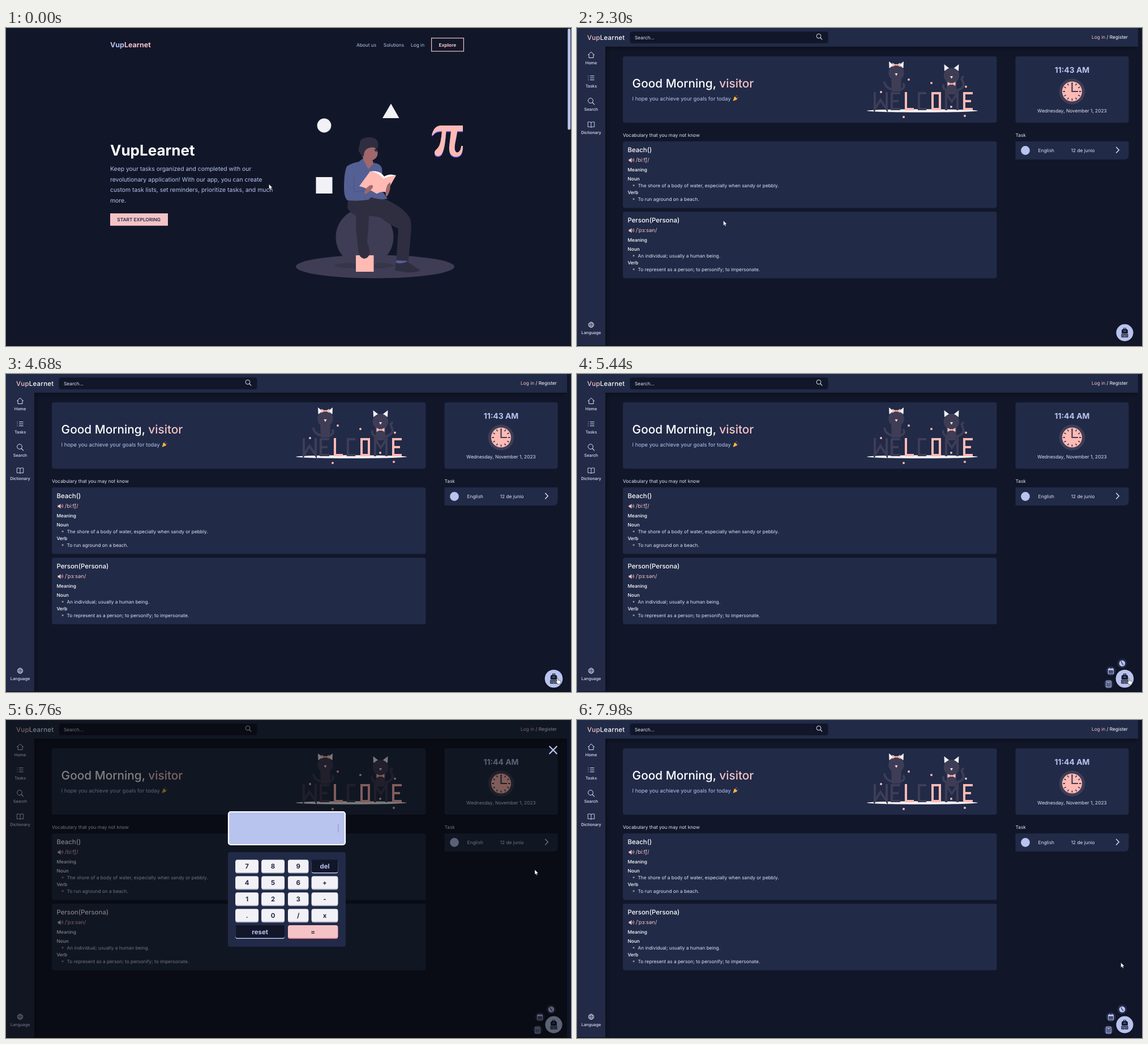
Write an HTML page that moves like this. It is 998 by 561 pixels and loops after 8 s.

```html
<!DOCTYPE html>
<html lang="en">
<head>
<meta charset="utf-8">
<title>Study app tour</title>
<style>
html,body{margin:0;width:100%;height:100%;overflow:hidden;background:#111729}
svg{display:block;width:998px;height:561px}
text{font-family:Inter,"Noto Sans",sans-serif;font-optical-sizing:none;text-rendering:geometricPrecision;white-space:pre}
</style>
</head>
<body>
<svg id="stage" viewBox="0 0 998 561" xmlns="http://www.w3.org/2000/svg"></svg>
<script>
const BG = '#111729', PANEL = '#212a47', LAV = '#b8c3ee', PINK = '#f4c3c6', WHITE = '#fffffe',
  SOFT = '#dfe3f5', DARK = '#2f2e41', PLUM = '#3f3d56', ROSE = '#ffbab4', SKIN = '#a0686a', LOOP = 8000;

const text = (x, y, size, str, fill = WHITE, weight = 400, extra = '') =>
  `<text x="${x}" y="${y}" font-size="${size}" fill="${fill}" font-weight="${weight}" ${extra}>${str}</text>`;
const mid = (x, y, size, str, fill, weight, extra = '') =>
  text(x, y, size, str, fill, weight, 'text-anchor="middle" ' + extra);
const rect = (x, y, w, h, fill, r = 0, extra = '') =>
  `<rect x="${x}" y="${y}" width="${w}" height="${h}" rx="${r}" fill="${fill}" ${extra}/>`;
const circle = (x, y, r, fill, extra = '') => `<circle cx="${x}" cy="${y}" r="${r}" fill="${fill}" ${extra}/>`;
const oval = (x, y, rx, ry, fill, extra = '') =>
  `<ellipse cx="${x}" cy="${y}" rx="${rx}" ry="${ry}" fill="${fill}" ${extra}/>`;
const path = (d, fill, extra = '') => `<path d="${d}" fill="${fill}" ${extra}/>`;
const line = (d, stroke, w = 1, extra = '') =>
  `<path d="${d}" fill="none" stroke="${stroke}" stroke-width="${w}" ${extra}/>`;
const group = (id, body, extra = '') => `<g id="${id}" ${extra}>${body}</g>`;
const span = (str, fill) => `<tspan fill="${fill}">${str}</tspan>`;
const round = 'stroke-linecap="round" stroke-linejoin="round"';

function reader() {
  const pi = 'M752 189C755 177 760 172 770 172H807V182H797C796 194 791 207 793 215C795 223 803 220 804 208H807C807 221 803 227 795 227C785 227 782 219 783 208L786 182H777.500C776 198 775 213 770 222C766 228 757 227 757 220C757 215 762 214 765 208C768 202 769 192 770 182H768C760 182 757 185 754 189Z';
  return oval(652, 421, 140, 20.5, PLUM) +
    oval(633, 419, 53, 5.5, '#373549') + circle(633.5, 369, 51, PLUM) +
    rect(618, 401, 31.5, 29, ROSE) +
    rect(547.5, 263, 29, 29, '#f2f1f5') + circle(562, 172, 12.4, '#f2f1f5') + path('M680 133.5L694.5 159H665Z', '#f2f1f5') +
    path(pi, '#6c63ff', 'transform="translate(0 1.5)"') + path(pi, ROSE) +
    // legs and shoes
    path('M690 409H710L705 415H689Z', '#56619a') +
    path('M688 414Q698 417 709 412Q721 421 732 427Q729 431 711 431.500L687 428Z', DARK) +
    path('M604 303L662 299Q699 313 712 333Q717 341 715.500 357L711 411L689.500 410L693 354Q674 345 661 334L641 331L640 354L638 378Q643 390 642 399Q640 406 632 407Q624 405 622 393L620.500 376L618 354V331Q606 325 603 317Z', DARK) +
    // head, neck and shirt
    path('M630 224L647 232L650 241L640 250L631 234Z', SKIN) + oval(644, 221, 12.5, 12.5, SKIN) +
    path('M623 213L626 198Q634 191.500 646 193Q656 195 657.500 204L657 213Q646 208 638 213Q632 217 632 225L629 228Q626 220 623 218Z', DARK) +
    path('M650 215Q653 212 656 215L654 219Z', DARK) +
    path('M623 236L630 230.500L640 249L650 238Q661 239 664 247L666 290L674 301Q664 304 645 299L640 303Q620 306 603 304Q597 299 597 282Q597 255 602 244Q611 238 623 236Z', '#545f93') +
    line('M616 262Q613 274 615 289L633 287', '#46507f', .8) +
    // book and hands
    path('M643 253Q660 250 668 262Q677 256 689 260L680 272L655 284L640 263Z', '#fff') +
    path('M643 253Q655 253 667 265.500Q677 261 689 260L672 290Q663 287 655 292.500Q640 283 624 279Z', ROSE) +
    path('M633 292Q634 283 642 278Q649 275 648 281Q643 289 635 293Z', SKIN) +
    path('M671 297Q669 287 674 276L679 272Q680 285 674 296Z', SKIN);
}

function landing() {
  const lines = ['Keep your tasks organized and completed with our', 'revolutionary application! With our app, you can create',
    'custom task lists, set reminders, prioritize tasks, and much', 'more.'];
  return rect(0, 0, 998, 561, BG) +
    text(184, 34, 12.48, span('Vup', LAV) + span('Learnet', PINK), LAV, 700) +
    text(619, 33, 8.32, 'About us', LAV) + text(666.8, 33, 8.32, 'Solutions', LAV) + text(715, 33, 8.32, 'Log in', LAV) +
    rect(751.6, 17.8, 56.8, 23.2, 'none', 0, `stroke="${PINK}" stroke-width="1.2"`) +
    mid(779.8, 33, 8.32, 'Explore', PINK, 700) +
    text(184, 225, 26, 'VupLearnet', WHITE, 700) +
    lines.map((s, i) => text(184, 251.8 + i * 18.72, 10.4, s, LAV)).join('') +
    rect(184, 327, 102, 21.8, PINK) + mid(234.7, 341, 8.32, 'START EXPLORING', '#232946', 600) +
    reader() + rect(992.2, 1, 5, 178.500, LAV, 2.5);
}

function cat(x, y, bowY) {
  const ear = s => path(`M${x + 13 * s} ${y - 20}L${x + 12.500 * s} ${y - 8}L${x + 4 * s} ${y - 13}Z`, '#f2f1f5');
  const bow = path(`M${x} ${bowY}l-7 -3.500v7zl7 -3.500v7z`, ROSE) + circle(x, bowY, 1.600, ROSE);
  return ear(-1) + ear(1) + circle(x, y, 13.8, PLUM) +
    path(`M${x - 9} ${y + 9}H${x + 9}L${x + 8} ${y + 33}H${x - 8}Z`, PLUM) +
    path(`M${x - 2.500} ${y + 1}h5l-2.500 4z`, '#f2f1f5') + circle(x, y + 4, 1.100, ROSE) +
    circle(x - 5, y - 2, .8, DARK) + circle(x + 5, y - 2, .8, DARK) + bow;
}

function welcome() {
  const dots = [[586, 91], [537, 113], [626, 97], [687, 103.5], [577, 157], [685, 155], [661, 139]];
  const e = x => `M${x + 15} 115H${x}V143H${x + 15}M${x} 129H${x + 12}`;
  return cat(564, 79, 65) + cat(661.5, 84, 98.5) +
    line('M555 108Q545 105 543 96M573 108Q580 105 577 99M654 110Q646 108 647 101M671 110Q687 106 681 93Q678 88 682 86', PLUM, 4, round) +
    oval(610, 146, 98, 2.7, '#f2f1f5') +
    line('M526 113V143L536 127L547 143V113' + e(556) + 'M617 115H604V143H617M652 145V115L662 130L672 115V145', PLUM, 4) +
    line('M581 113V143H595M628 115H641V143H628Z' + e(684), ROSE, 4) +
    dots.map(([x, y]) => circle(x, y, 2, ROSE)).join('');
}

function wallClock() {
  let ticks = '';
  for (let i = 0; i < 12; i++) {
    const a = i * Math.PI / 6, c = Math.cos(a), s = Math.sin(a);
    ticks += `M${874.5 + 12.500 * c} ${112 + 12.500 * s}L${874.5 + 16 * c} ${112 + 16 * s}`;
  }
  return circle(874.5, 112, 22.8, PLUM) + circle(874.5, 112, 17.6, ROSE) +
    line(ticks, PLUM, 1.8) + line('M874.500 97V112H885', PLUM, 2.2);
}

const popper = y => path(`M275.500 ${y + 3}L278 ${y - 5}Q282 ${y - 4} 283 ${y}Z`, '#f2b63c') +
  line(`M280 ${y - 5}q1 -2 3 -2M283 ${y - 2}q1 -2 2.500 -1`, '#c9655a', .8);

// Greeting, clock and task panels; the tall form has the pictures.
function panels(tall) {
  const h = tall ? 117 : 63, d = tall ? 54 : 0, g = tall ? 27 : 0;
  const font = tall ? '' : 'style="font-family:\'Liberation Sans\',sans-serif"';
  return rect(81, 50, 660.500, h, PANEL, 4) + rect(774.500, 50, 200, h, PANEL, 4) +
    text(97.6, 77.6 + g, 20.8, 'Good Morning, ' + span('visitor', PINK), WHITE, tall ? 500 : 400, font) +
    text(97.6, 101 + g, 9.36, 'I hope you achieve your goals for today', LAV) + popper(99 + g) +
    mid(874.500, tall ? 78.6 : 73, 13.9, '11:43 AM', LAV, 700, 'class="time"') +
    mid(874.500, tall ? 149 : 101.2, 8.32, 'Wednesday, November 1, 2023', SOFT) +
    text(81, 137.500 + d, 8.32, 'Vocabulary that you may not know', SOFT) +
    text(774.500, 137.500 + d, 8.32, 'Task', SOFT) +
    path(`M774.500 ${146 + d}h200v24q0 8 -8 8h-192z`, PANEL) + circle(792, 162 + d, 7.9, LAV) +
    text(814.6, 165 + d, 8.32, 'English', SOFT) + text(872.7, 165 + d, 8.32, '12 de junio', SOFT) +
    line(`M952.300 ${156 + d}l5 5.300l-5 5.300`, SOFT, 1.4) + (tall ? welcome() + wallClock() : '');
}

function word(y, title, sound, noun, verb) {
  const item = (dy, s) => text(98, y + dy + 1, 8.32, '*', PINK) + text(107.500, y + dy, 8.32, s, SOFT);
  const head = (dy, s) => text(89.4, y + dy, 8.32, s, WHITE, 500);
  return rect(81, y, 660.500, 117.5, PANEL, 4) + text(89.4, y + 19.4, 11.44, title, WHITE, 500) +
    path(`M91.500 ${y + 31.500}h2l3 -2.500v8.500l-3 -2.500h-2z`, PINK) +
    line(`M98 ${y + 31}q1.500 2 0 4M99.500 ${y + 29.500}q2.600 3.500 0 7`, PINK, .8) +
    text(103.8, y + 36.400, 9.36, sound, PINK) + head(52.500, 'Meaning') + head(68.700, 'Noun') +
    item(81, noun) + head(93, 'Verb') + item(105, verb);
}

function bars() {
  const label = (y, s) => mid(25, y, 7.28, s, SOFT, 500);
  const lens = (x, y, r) => line(`M${x + r * .7} ${y + r * .7}l${r * .8} ${r * .8}`, SOFT, 1.100, round) +
    circle(x, y, r, 'none', `stroke="${SOFT}" stroke-width="1"`);
  return rect(0, 0, 991, 33, PANEL, 0, 'filter="url(#shade)"') + rect(0, 33, 50, 528, PANEL, 0, 'filter="url(#shade)"') +
    rect(0, 0, 991, 33, PANEL) +
    text(18, 20.5, 11.44, span('Vup', PINK) + 'Learnet', WHITE, 500, 'letter-spacing=".25"') +
    rect(93.500, 6.300, 350, 20.700, BG, 4) + text(102, 20, 8.32, 'Search...', SOFT) + lens(427, 14.300, 3.9) +
    text(973, 19.4, 8.32, span('Log in', PINK) + ' / Register', WHITE, 400, 'text-anchor="end"') +
    line('M19.500 47.500L25 42.300L30.500 47.500M21 46.500V52.500H29V46.500', SOFT, 1, round) + label(63.700, 'Home') +
    line('M23 84.500H30.500M23 88H30.500M23 91.500H30.500M19.500 84.500h1M19.500 88h1M19.500 91.500h1', SOFT, 1) + label(104.700, 'Tasks') +
    lens(24, 128.200, 4.400) + label(145.700, 'Search') +
    line('M25 166.500Q22 165 19.300 166V174.500Q22 173.500 25 175Q28 173.500 30.700 174.500V166Q28 165 25 166.500V175', SOFT, .9, round) + label(186.700, 'Dictionary') +
    circle(25, 523.600, 4.600, 'none', `stroke="${SOFT}"`) + oval(25, 523.600, 2, 4.600, 'none', `stroke="${SOFT}" stroke-width=".8"`) +
    line('M20.500 522H29.500M20.500 525.300H29.500', SOFT, .8) + label(540.200, 'Language');
}

const disc = (id, x, y, icon) =>
  group(id, circle(0, 0, 8.7, PANEL, 'filter="url(#soft)"') + icon, `data-x="${x}" data-y="${y}"`);

function tools() {
  const ink = '#171d33';
  const clock = circle(0, 0, 5.300, LAV) + line('M0 .5L-2 -3.500M0 .5L2 2.500', PANEL, 1.100);
  const calendar = rect(-4.500, -3.800, 9, 8.800, 'none', 1, `stroke="${LAV}" stroke-width="1.200"`) + rect(-4.500, -3.800, 9, 2.600, LAV) +
    line('M-2.500 -5.500v3M2.500 -5.500v3', LAV, 1.200) + line('M-2.700 1H3M-2.700 3H3', LAV, 1, 'stroke-dasharray="1.200 1"');
  const calc = rect(-4.300, -5.300, 8.600, 10.600, 'none', 1, `stroke="${LAV}" stroke-width="1.200"`) + rect(-2.600, -3.500, 5.200, 2, LAV) +
    line('M-2.600 .5H3M-2.600 3H3', LAV, 1.300, 'stroke-dasharray="1.300 .7"');
  const bag = path('M-5.500 1V-3Q-5.500 -6.500 -2 -6.500H2Q5.500 -6.500 5.500 -3V1L3 2H-3Z', ink) +
    line('M-2 -6.500V-8H2V-6.500', ink, 1) + rect(-6, 2, 12, 6.300, ink, 1) +
    rect(-2, -3, 4, .8, LAV) + line('M-5 2.200H5M0 4V8', LAV, .7) +
    rect(-4.500, 4.200, 3.200, 2.400, 'none', .4, `stroke="${LAV}" stroke-width=".7"`) +
    rect(1.300, 4.200, 3.200, 2.400, 'none', .4, `stroke="${LAV}" stroke-width=".7"`);
  return disc('clock', 963, 510.500, clock) + disc('calendar', 943, 524, calendar) + disc('calc', 939, 547, calc) +
    group('tip', rect(-15, -4.700, 30, 9.400, LAV, 2) + mid(0, 1.900, 5.2, 'Calculator', '#232946', 600)) +
    group('fab', circle(0, 0, 15, LAV, 'filter="url(#soft)"') + bag);
}

function calculator() {
  const cols = [[405.200, 40.800], [451.200, 40.800], [498, 36.300], [539.700, 46.600]];
  const key = (x, y, w, s, fill, edge, ink) =>
    rect(x, y + 1.600, w, 22.400, edge, 3.500) + rect(x, y, w, 22.400, fill, 3.500) + mid(x + w / 2, y + 15.600, 11.44, s, ink, 700);
  const rows = ['7 8 9 del', '4 5 6 +', '1 2 3 -', '. 0 / x'];
  const keys = rows.map((r, i) => r.split(' ').map((s, j) => {
    const args = s === 'del' ? ['#121629', LAV, LAV] : ['#f2f1f6', '#aeb2c6', '#232946'];
    return key(cols[j][0], 246.500 + i * 28.900, cols[j][1], s, ...args);
  }).join('')).join('');
  return rect(393, 162, 206, 58, LAV, 4, 'stroke="#fff" stroke-width="2.200"') + rect(586.500, 184, .8, 14.500, '#7f86a8') +
    rect(392, 233, 208, 167, PANEL, 4) + keys +
    key(405.200, 362, 86.800, 'reset', '#121629', LAV, LAV) + key(498, 362, 88.300, '=', PINK, '#e8788c', '#232946') +
    line('M960.300 46.800L972.700 59.200M972.700 46.800L960.300 59.200', LAV, 2.300, round);
}

document.getElementById('stage').innerHTML =
  `<defs><filter id="shade" x="-10%" y="-100%" width="130%" height="300%"><feDropShadow dx="0" dy="0" stdDeviation="6" flood-color="#000" flood-opacity=".55"/></filter>
  <filter id="soft" x="-50%" y="-50%" width="200%" height="200%"><feDropShadow dx="0" dy="1" stdDeviation="1.800" flood-color="#000" flood-opacity=".5"/></filter></defs>` +
  group('landing', landing()) +
  group('app', rect(0, 0, 998, 561, BG) + group('small', panels(false)) + group('tall', panels(true)) +
    group('words',
      word(200, 'Beach()', '/biːt͡ʃ/', 'The shore of a body of water, especially when sandy or pebbly.', 'To run aground on a beach.') +
      word(324, 'Person(Persona)', '/ˈpɜːsən/', 'An individual; usually a human being.', 'To represent as a person; to personify; to impersonate.')) +
    bars() + rect(991, 0, 7, 561, BG) + tools()) +
  rect(0, 560, 998, 1, '#090c15') +
  group('status', rect(0, 550.500, 102, 10, '#2d2c2c', 1) +
    text(2.500, 558, 6.24, 'https://vup-learnet.vorlu.test/app', '#fff', 400, 'style="font-family:\'Open Sans\',sans-serif"')) +
  group('modal', rect(0, 0, 991, 561, '#030200', 0, 'opacity=".5"') + calculator()) +
  group('cursor',
    group('arrow', path('M0 0V8.800L2 7L3.400 10L4.800 9.400L3.500 6.500L6.200 6.300Z', '#fff', 'stroke="#000" stroke-width=".4"')) +
    group('hand', path('M-1 .9Q0 -.4 1 .9V4L5 5Q6.200 5.400 6 6.800L5.200 9.500V11H-.2V9.600L-3 6.600Q-2.600 5.200 -1 6.400Z', '#fff', 'stroke="#111" stroke-width=".5"')));

const $ = id => document.getElementById(id);
const times = document.querySelectorAll('.time');
const items = ['clock', 'calendar', 'calc'].map($);

// Cursor stops: time, x, y.
const stops = [[0, 464.5, 275.5], [340, 206, 346], [600, 258, 340], [2280, 258, 340], [2360, 261, 338], [2640, 261, 338],
  [3000, 450, 105], [3200, 610, 63], [3460, 765, 192], [3820, 858, 400], [4240, 976, 541], [4680, 974, 536], [5100, 975, 537],
  [5420, 975, 537], [5780, 956, 541], [6140, 948, 545], [6320, 948, 545], [6760, 934, 264.500], [7140, 965, 57],
  [7240, 966, 53], [7440, 966, 53], [7740, 969, 150], [7960, 965, 398], [8000, 955, 458]];

function slope(i, k) {
  const a = stops[i - 1], p = stops[i], b = stops[i + 1];
  if (!a || !b) return 0;
  if ((a[1] === p[1] && a[2] === p[2]) || (b[1] === p[1] && b[2] === p[2])) return 0;
  return (b[k] - a[k]) / (b[0] - a[0]);
}

function cursorAt(t) {
  let i = 0;
  while (i < stops.length - 2 && t >= stops[i + 1][0]) i++;
  const a = stops[i], b = stops[i + 1], d = b[0] - a[0], u = (t - a[0]) / d, u2 = u * u, u3 = u2 * u;
  return [1, 2].map(k => {
    const end = i === stops.length - 2 ? (b[k] - a[k]) / d : slope(i + 1, k);
    return a[k] * (2 * u3 - 3 * u2 + 1) + b[k] * (3 * u2 - 2 * u3) + d * ((u3 - 2 * u2 + u) * slope(i, k) + (u3 - u2) * end);
  });
}

const ramp = (t, a, b) => Math.min(1, Math.max(0, (t - a) / (b - a)));
const ease = u => 1 - (1 - u) ** 3;
const show = (id, on) => $(id).style.display = on ? '' : 'none';
const fade = (id, o) => { $(id).style.opacity = o; show(id, o > 0); };
const place = (el, x, y, more = '') => el.setAttribute('transform', `translate(${x} ${y}) ${more}`);

function draw(t) {
  show('landing', t < 1360);
  show('app', t >= 1360);
  show('small', t < 1460);
  show('tall', t >= 1460);
  show('words', t >= 1740);
  fade('status', ramp(t, 760, 940) * (1 - ramp(t, 1800, 1920)));
  const now = t < 4900 ? '11:43 AM' : '11:44 AM';
  times.forEach(e => { if (e.textContent !== now) e.textContent = now; });

  const hover = ramp(t, 4220, 4340) * (1 - ramp(t, 5600, 5720));
  place($('fab'), 967.5, 537.5, `scale(${1 + .05 * hover})`);

  const open = ease(ramp(t, 5100, 5280)), over = ramp(t, 5860, 5960) * (1 - ramp(t, 6340, 6440));
  items.forEach(el => {
    const s = open * (el.id === 'calc' ? 1 + .1 * over : 1);
    place(el, 967.5 + (el.dataset.x - 967.5) * open, 537.5 + (el.dataset.y - 537.5) * open, `scale(${s})`);
    el.style.display = open > 0 ? '' : 'none';
  });
  fade('tip', over);
  place($('tip'), 913.5 - 14 * (1 - ease(over)), 542.5, 'rotate(9)');
  fade('modal', ease(ramp(t, 6330, 6560)) * (1 - ramp(t, 7420, 7600)));

  const [x, y] = cursorAt(t);
  const hand = (t > 270 && t < 1360) || (t > 4210 && t < 6350) || (t > 7120 && t < 7520);
  show('hand', hand);
  show('arrow', !hand);
  place($('cursor'), x, y);
}

const start = performance.now();
function tick(now) {
  draw(Math.max(0, now - start) % LOOP);
  requestAnimationFrame(tick);
}
draw(0);
requestAnimationFrame(tick);
</script>
</body>
</html>
```
